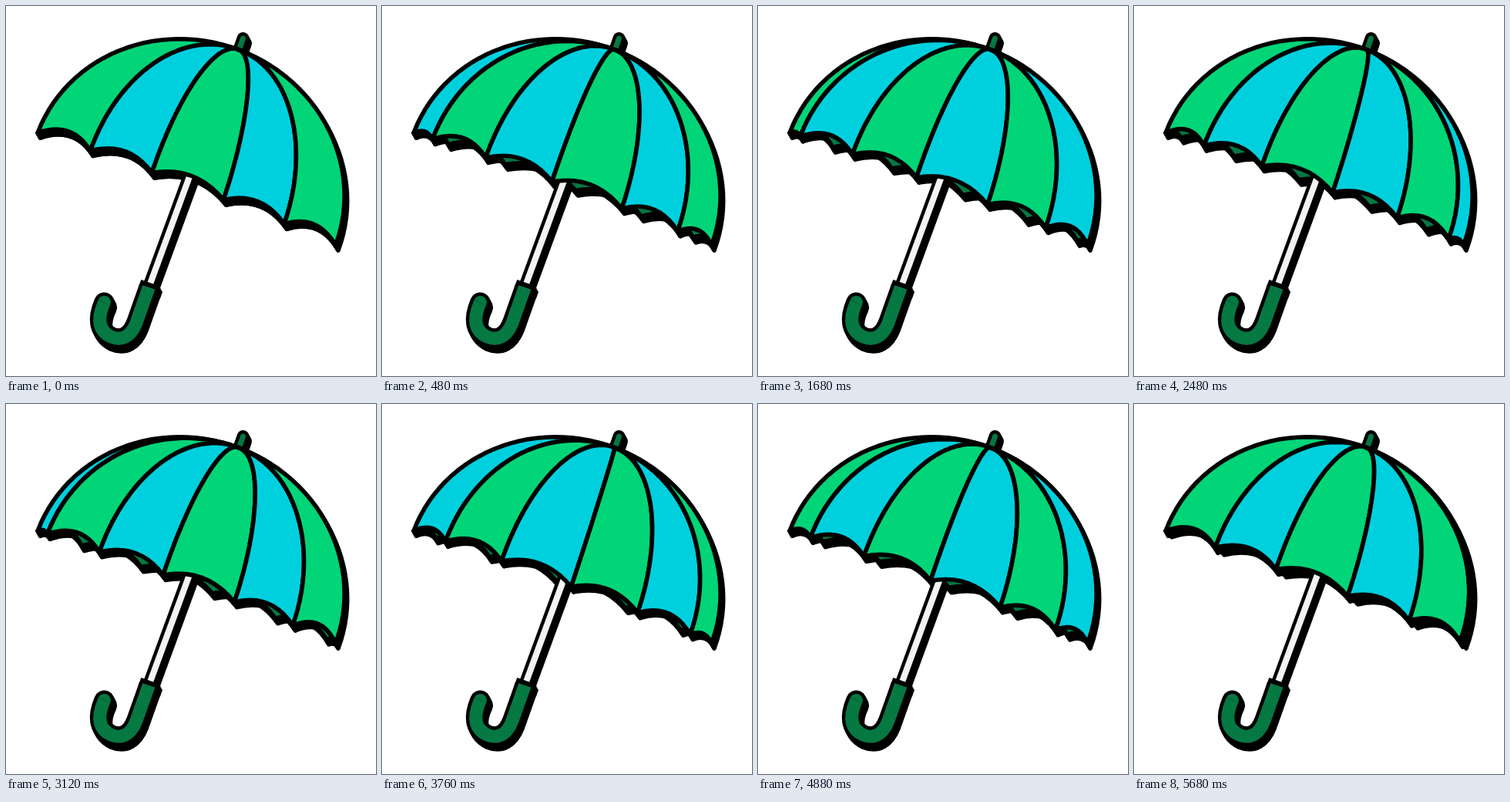
An HTML page with a canvas that plays this animation: 480 by 480 pixels, repeating every 5760 ms.

```html
<!DOCTYPE html>
<html lang="en">
<head>
<meta charset="utf-8">
<title>Spinning umbrella</title>
<style>
  html, body { margin: 0; width: 100%; height: 100%; overflow: hidden; background: #fff; }
  canvas { display: block; width: 480px; height: 480px; }
</style>
</head>
<body>
<canvas id="stage" width="480" height="480"></canvas>
<script>
const ctx = document.getElementById('stage').getContext('2d');

const GREEN = '#02d478', CYAN = '#00d0de', DARK = '#067842', WHITE = '#f4f2f2', BLACK = '#000';
const STEP = 80, LOOP = 5760, STEPS_PER_PANEL = 18;
const RADIUS = 206.5, HEIGHT = 193, EDGE = 2.5;    // canopy size; half the rim in panels
const TILT = 20.68;
const SHADOW = [3.5, 6.5];
const LINE = 5.6, OUTLINE = 4.5;

const tilted = new DOMMatrix().translate(234.3, 237.5).rotate(TILT);

// Rim position across the canopy for a panel coordinate
function rimX(p) {
  const a = Math.abs(p);
  return RADIUS * Math.sign(p) * (a * (0.505 - 0.0475 * a) + 0.034 * Math.pow(a / EDGE, 12));
}

function rimY(x) {
  const u = x / RADIUS;
  return 4 * u * u - 4;
}

// Quarter ellipse between the apex and the rim, leaning a little off the axis
function seam(path, x, down) {
  const n = 28, lean = 1 - (x / RADIUS) ** 2;
  for (let i = 0; i <= n; i++) {
    const s = (down ? n - i : i) / n * Math.PI / 2;
    const shift = lean * (Math.sin(s) + 3 * Math.sin(2 * s));
    path.lineTo(x * Math.cos(s) - shift, -HEIGHT * Math.sin(s) + rimY(x) * Math.cos(s));
  }
}

function scallop(path, a, b) {
  const depth = 14.5 * Math.min(1, Math.abs(b - a) / 60);
  const midY = (rimY(a) + rimY(b)) / 2;
  path.quadraticCurveTo((a + b) / 2, midY - 2 * depth, b, rimY(b));
}

function inTilt(path) {
  const out = new Path2D();
  out.addPath(path, tilted);
  return out;
}

function panel(a, b) {
  const path = new Path2D();
  path.moveTo(0, -HEIGHT);
  seam(path, a, true);
  scallop(path, a, b);
  seam(path, b, false);
  path.closePath();
  return inTilt(path);
}

function backRim(xs) {
  const path = new Path2D();
  path.moveTo(xs[0], rimY(xs[0]));
  for (let i = 1; i < xs.length; i++) scallop(path, xs[i - 1], xs[i]);
  path.lineTo(185, -40);
  path.lineTo(-185, -40);
  path.closePath();
  return inTilt(path);
}

const shaft = new Path2D('M240 216 L185.7 364');
const collar = new Path2D('M187.5 359.5 L184 369');
const hook = new Path2D('M185.3 365 L169 411 C162 429 150 435 136 429 C120 421 118 406 127.3 384.5');
const hookTip = new Path2D('M126.5 387 L127.5 384.5');
const ferrule = new Path2D('M303 55 L307.5 42');

const area = (path, fill) => ({ path, fill });
const tube = (path, color, width, cap) => ({ path, color, width, cap });

function buildScene(turn) {
  const xs = [-RADIUS], colors = [];
  const first = Math.floor(-EDGE - turn + 0.5 + 1e-6);
  for (let k = first; k - 0.5 + turn < EDGE - 1e-6; k++) {
    const right = k + 0.5 + turn;
    colors.push(k % 2 ? CYAN : GREEN);
    xs.push(right < EDGE - 1e-6 ? rimX(right) : RADIUS);
  }
  const back = xs.map(x => -x).reverse();
  return [
    area(backRim(back), DARK),
    tube(shaft, WHITE, 8, 'butt'),
    tube(collar, BLACK, 17, 'butt'),
    tube(hookTip, DARK, 17, 'round'),
    tube(hook, DARK, 17, 'butt'),
    tube(ferrule, DARK, 7, 'round'),
    ...colors.map((c, i) => area(panel(xs[i], xs[i + 1]), c))
  ];
}

function stroke(path, color, width, cap) {
  ctx.strokeStyle = color;
  ctx.lineWidth = width;
  ctx.lineCap = cap || 'round';
  ctx.stroke(path);
}

function paint(s, flat) {
  if (s.fill) {
    ctx.fillStyle = flat ? BLACK : s.fill;
    ctx.fill(s.path);
    stroke(s.path, BLACK, LINE);
  } else {
    stroke(s.path, BLACK, s.width + 2 * OUTLINE, s.cap);
    if (!flat) stroke(s.path, s.color, s.width, s.cap);
  }
}

// Steady spin, slightly ahead in the first half of the loop and behind in the second
function turnAt(time) {
  const frame = Math.floor((time % LOOP) / STEP);
  return frame / STEPS_PER_PANEL + 0.015 * Math.sin(2 * Math.PI * frame * STEP / LOOP);
}

function draw(time) {
  const scene = buildScene(turnAt(time));
  ctx.setTransform(1, 0, 0, 1, 0, 0);
  ctx.fillStyle = '#fff';
  ctx.fillRect(0, 0, 480, 480);
  ctx.lineJoin = 'round';
  for (const k of [1, 0.66, 0.33]) {
    ctx.setTransform(1, 0, 0, 1, SHADOW[0] * k, SHADOW[1] * k);
    scene.forEach(s => paint(s, true));
  }
  ctx.setTransform(1, 0, 0, 1, 0, 0);
  scene.forEach(s => paint(s, false));
}

const start = performance.now();
function tick() {
  draw(performance.now() - start);
  requestAnimationFrame(tick);
}
tick();
</script>
</body>
</html>
```
